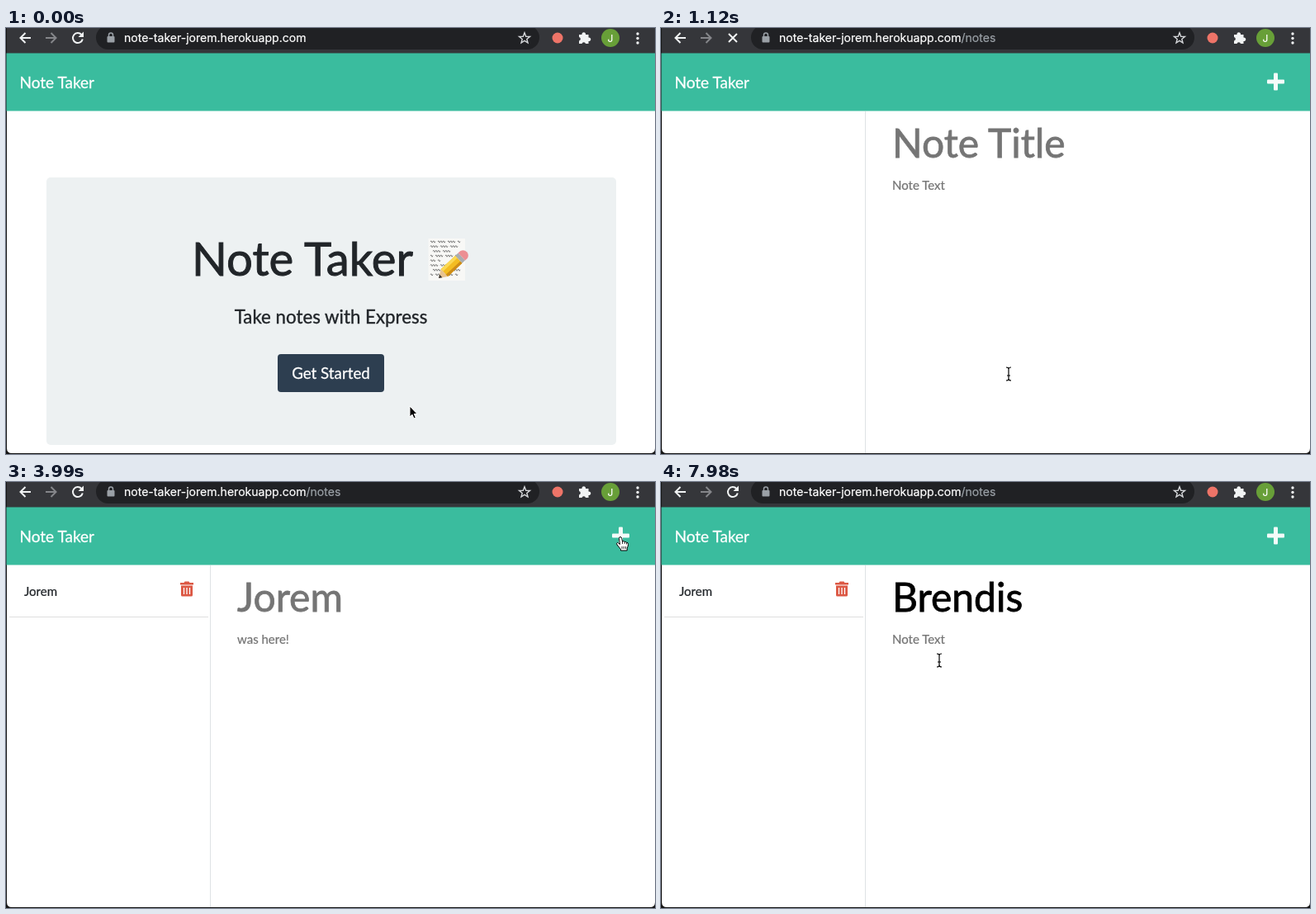
Animation, 786 px wide and 516 px high, one loop 8 s. Source, as an HTML page:

```html
<!DOCTYPE html>
<html lang="en">
<head>
<meta charset="utf-8">
<title>Note Taker</title>
<style>
  html, body { margin: 0; height: 100%; overflow: hidden; background: #000; }
  svg { display: block; width: 100vw; height: 100vh; }
  text, tspan { fill: currentColor; stroke: currentColor; }
  text { font-family: Lato, sans-serif; color: #212529; stroke-width: .016em; white-space: pre; }
  .ui { font-family: Inter, Roboto, sans-serif; }
  .line { fill: none; stroke-width: 2; }
</style>
</head>
<body>
<svg viewBox="0 0 786 516">
  <rect width="786" height="516" fill="#141414"/>
  <path d="M1 0H786V509Q786 515 780 515H7Q1 515 1 509Z" fill="#fff"/>

  <!-- browser toolbar -->
  <rect x="1" width="785" height="31" fill="#35363a"/>
  <rect x="109" y="-3" width="537" height="29" rx="14.5" fill="#202124"/>
  <path class="line" stroke="#f1f3f4" d="M30 12H18M23.5 6L17.5 12L23.5 18"/>
  <path class="line" stroke="#85868a" d="M48 12H60M54.5 6L60.5 12L54.5 18"/>
  <g id="reload">
    <path class="line" stroke="#f1f3f4" d="M91.4 8A6 6 0 1 0 92.8 13.5"/>
    <path fill="#f1f3f4" d="M94 4.5V11H87.5Z"/>
  </g>
  <path id="stop" class="line" stroke="#f1f3f4" d="M82 7L92 17M92 7L82 17"/>
  <rect x="122.5" y="10" width="9" height="7.5" rx="1" fill="#9aa0a6"/>
  <path class="line" style="stroke-width:1.5" stroke="#9aa0a6" d="M124.5 10V8.5A2.5 2.5 0 0 1 129.5 8.5V10"/>
  <text class="ui" x="143" y="17" font-size="14.050"><tspan style="color:#fff">note-taker-jorem.herokuapp.com</tspan><tspan id="path" style="color:#9aa0a6">/notes</tspan></text>
  <path id="star" class="line" style="stroke-width:1.4" stroke="#d5d7da"/>
  <circle cx="668" cy="12" r="6.5" fill="#ee7468"/>
  <path fill="#f1f3f4" d="M694 8H697.5A2.3 2.3 0 1 1 702 8H705.5V11.5A2.3 2.3 0 1 1 705.5 16V19H702A2.3 2.3 0 0 0 697.5 19H694V15.5A2.3 2.3 0 0 0 694 11Z"/>
  <circle cx="732" cy="12" r="11" fill="#689f38"/>
  <text class="ui" x="732" y="16.5" font-size="12" text-anchor="middle" style="color:#fff">J</text>
  <g fill="#f1f3f4"><circle cx="765" cy="7" r="1.7"/><circle cx="765" cy="12.5" r="1.7"/><circle cx="765" cy="18" r="1.7"/></g>

  <!-- site header -->
  <rect x=".5" y="30.5" width="785.5" height="70" fill="#3abc9e"/>
  <text x="16.500" y="73" font-size="19" style="color:#fff">Note Taker</text>

  <g id="home">
    <rect x="49" y="181" width="690" height="324" rx="5" fill="#edf1f2"/>
    <text x="225" y="300" font-size="56.3">Note Taker</text>
    <rect x="511.5" y="255" width="44.5" height="51" fill="#f8f8f6"/>
    <path id="scribble" class="line" style="stroke-width:.9" stroke="#777"/>
    <g transform="translate(524 303) rotate(-43) scale(.95)">
      <path fill="#e8c391" d="M0 0L10 -6.5V6.5Z"/>
      <path fill="#333" d="M0 0L4 -2.5V2.5Z"/>
      <rect x="10" y="-6.5" width="25" height="13" fill="#f3bd22"/>
      <rect x="10" y="-6.5" width="25" height="4" fill="#fbd955"/>
      <rect x="10" y="3" width="25" height="3.5" fill="#cf8d17"/>
      <rect x="35" y="-6.5" width="5" height="13" fill="#a9adb0"/>
      <path fill="#ec8f93" d="M40 -6.5H44Q49 -5 49 0Q49 5 44 6.5H40Z"/>
    </g>
    <text x="393.5" y="358" font-size="22.3" text-anchor="middle">Take notes with Express</text>
    <rect id="ring" x="326" y="392" width="135" height="52" rx="7" fill="#98a2a9"/>
    <rect id="button" x="329" y="395" width="129" height="46" rx="4"/>
    <text x="393.5" y="425" font-size="18.75" text-anchor="middle" style="color:#fff">Get Started</text>
  </g>

  <g id="notes">
    <rect x="247" y="101" width="1" height="414" fill="#dfe2e5"/>
    <rect x="734" y="62.5" width="21" height="5" rx="1" fill="#f4fbf9"/>
    <rect x="742" y="54.500" width="5" height="21" rx="1" fill="#f4fbf9"/>
    <g id="item">
      <text x="22" y="138" font-size="15">Jorem</text>
      <path fill="#dc5844" d="M211 122h4.5l1-1.5h5l1 1.5h4.5v2.5h-16zM212 125.5h14v11.5q0 1.5-1.5 1.5h-11q-1.5 0-1.5-1.5z"/>
      <path class="line" style="stroke-width:1.3" stroke="#fff" d="M215.5 128v8M219 128v8M222.5 128v8"/>
      <rect x="4" y="163" width="241" height="1" fill="#dfdfdf"/>
    </g>
    <text id="title" x="280" y="157" font-size="48"></text>
    <text id="body" x="280" y="196" font-size="15" style="color:#757575"></text>
    <rect id="caret" y="114" width="1" height="50"/>
  </g>

  <g id="status">
    <path fill="#35363a" d="M1 494H256Q261 494 261 499V515H7Q1 515 1 509Z"/>
    <text class="ui" x="6" y="509" font-size="12.050" style="color:#c3c6ca">note-taker-jorem.herokuapp.com/notes</text>
  </g>

  <!-- pointers, hot spot at 0,0 -->
  <path id="arrow" stroke="#fff" d="M0 0V13L3 10.3L5 15L7.3 14L5.3 9.5H9Z"/>
  <g id="hand" fill="#fff" stroke="#000" stroke-linejoin="round">
    <path d="M-1.5 1.5Q-1.5 -.5 0 -.5Q1.5 -.5 1.8 1.5L2.5 5Q4.5 4 5.2 5.5Q7 4.8 7.5 6.3Q9.5 6 9.5 8.5Q9.5 11 8.2 13V16H.5V14.5L-4 9Q-5.3 7 -3.5 6.6Q-2.5 6.5 -.5 8.5Z"/>
    <path d="M2.5 5V8M5.2 5.5V8M7.5 6.3V8.5M2 11V14M4.2 11V14M6.4 11V14" stroke-width=".8"/>
  </g>
  <g id="beam" fill="none">
    <path id="beamHalo" stroke="#fff" stroke-width="2.5"/>
    <path id="beamCore" stroke="#000" stroke-width="1.2"/>
  </g>
</svg>
<script>
const LOOP = 8000, STEP = 70;
const $ = id => document.getElementById(id);
const show = (id, on) => $(id).style.display = on ? '' : 'none';

const beamShape = 'M-3 -8Q0 -8 0 -6Q0 -8 3 -8M0 -6V6M-3 8Q0 8 0 6Q0 8 3 8M-2 2H2';
$('beamHalo').setAttribute('d', beamShape);
$('beamCore').setAttribute('d', beamShape);

const starPoints = Array.from({ length: 10 }, (_, i) => {
  const r = i % 2 ? 2.9 : 6.8, a = i * Math.PI / 5;
  return (628 + r * Math.sin(a)).toFixed(1) + ' ' + (12.5 - r * Math.cos(a)).toFixed(1);
});
$('star').setAttribute('d', 'M' + starPoints.join('L') + 'Z');

// Wavy handwriting: rows of uneven length with word gaps
let ink = '';
for (let row = 0; row < 8; row++) {
  const end = row === 4 ? 524 : 549 - row % 3 * 4;
  for (let x = 514; x < end; x += 3)
    if ((x + row * 5) % 4) ink += `M${x} ${259 + row * 5.7}q1 -2.5 1.5 0t1.5 -.5`;
}
$('scribble').setAttribute('d', ink);

// Pointer stops: time, x, y
const stops = [
  [0, 489, 458], [490, 421, 419], [1470, 421, 419], [1680, 316, 234],
  [2310, 74, 126], [3220, 74, 126], [3990, 744, 67], [4340, 744, 67],
  [4970, 382, 147], [7560, 382, 147], [7980, 337, 216], [LOOP, 337, 216]
];
function pointerAt(t) {
  const i = stops.findIndex(s => s[0] > t) - 1;
  const [t0, x0, y0] = stops[i], [t1, x1, y1] = stops[i + 1];
  const p = (t - t0) / (t1 - t0), e = p * p * (3 - 2 * p);
  return [x0 + (x1 - x0) * e, y0 + (y1 - y0) * e];
}
function pointerKind(x, y, home) {
  if (home) return x < 458 && y < 441 ? 'hand' : 'arrow';
  if (y < 101) return x > 730 ? 'hand' : 'arrow';
  if (x > 270) return 'beam';
  return x < 235 && y < 163 ? 'hand' : 'arrow';
}

const typed = 'Brendis';
const keyTimes = [6160, 6370, 6720, 6790, 6860, 7000, 7350];

function draw(t) {
  const home = t < 1120, loading = t >= 840 && t < 1330;
  const typing = t >= keyTimes[0] && t < 7630;
  const count = keyTimes.filter(k => k <= t).length;
  const opened = t >= 2380 && t < 4130;

  show('home', home);
  show('notes', !home);
  show('item', t >= 1260);
  show('path', t >= 840);
  show('reload', !loading);
  show('stop', loading);
  show('ring', t >= 770);
  show('status', t >= 700 && home);
  $('status').style.opacity = Math.min(1, (t - 630) / 210);

  const [x, y] = pointerAt(t);
  const kind = pointerKind(x, y, home);
  for (const id of ['arrow', 'hand', 'beam']) show(id, id === kind && !typing);
  $(kind).setAttribute('transform', `translate(${x} ${y})`);

  const shade = t >= 350 ? '#1e2b35' : t >= 280 ? '#25343f' : '#2d3e50';
  $('button').setAttribute('fill', shade);

  $('title').textContent = count ? typed.slice(0, count) : opened ? 'Jorem' : 'Note Title';
  $('title').style.color = count ? '#000' : '#757575';
  $('body').textContent = opened ? 'was here!' : 'Note Text';

  const caretOn = count ? t < keyTimes[count - 1] + 490 : t >= 5250 && t < 5740;
  show('caret', caretOn);
  if (caretOn) $('caret').setAttribute('x', 280 + (count ? $('title').getComputedTextLength() : 0));
}

const start = performance.now();
function tick() {
  const t = (performance.now() - start) % LOOP;
  draw(Math.floor(t / STEP) * STEP);
  requestAnimationFrame(tick);
}
tick();
</script>
</body>
</html>
```
